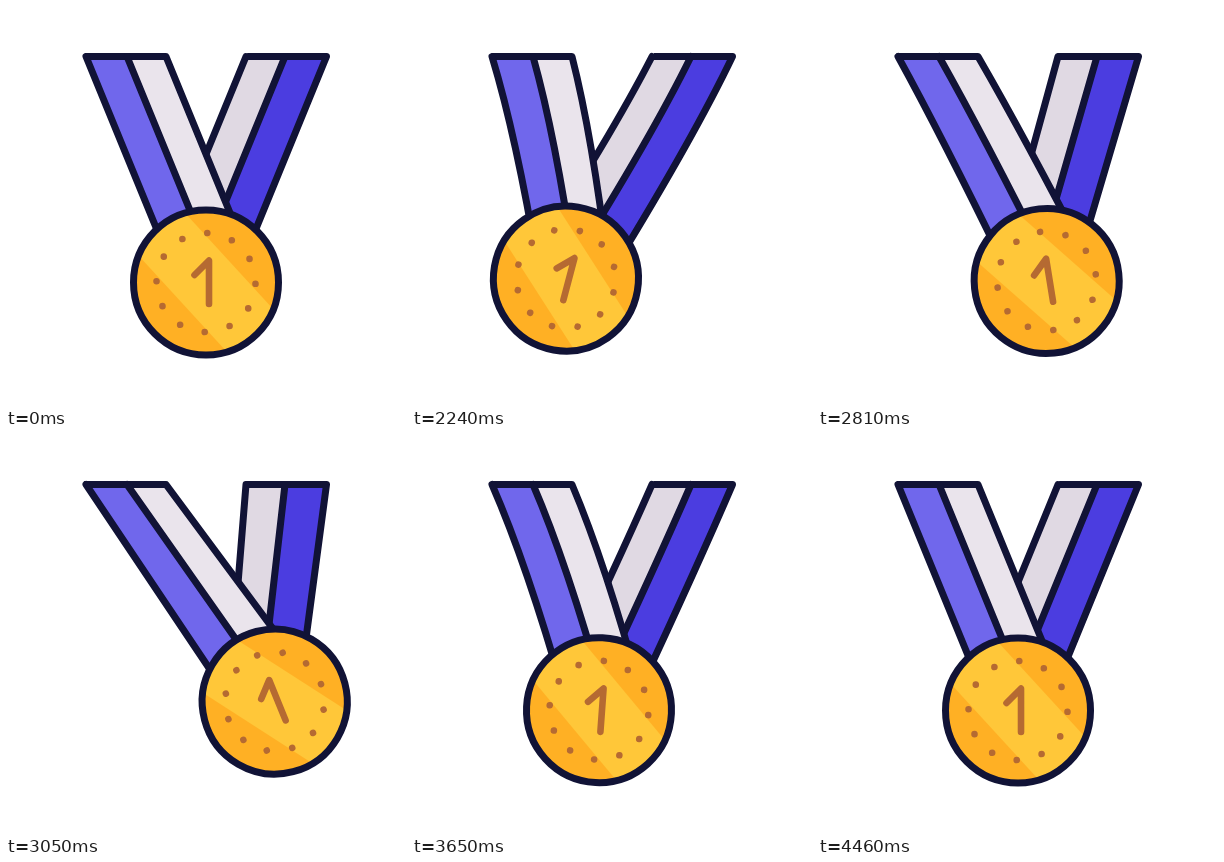
Recreate the animation shown at these times as an HTML page without scripts. Size 400x400 px, loop 4520 ms.

```html
<!DOCTYPE html>
<html lang="en">
<head>
<meta charset="utf-8">
<title>Swinging medal</title>
<style>
  /* --sway: how far the medal hangs to the left; --bend: curl of the front ribbon */
  @property --sway { syntax: "<number>"; inherits: true; initial-value: 0; }
  @property --bend { syntax: "<number>"; inherits: true; initial-value: 0; }

  @keyframes sway {
    0% { --sway: 0; --bend: 0; }
    44.25% { --sway: 0; --bend: 0; animation-timing-function: cubic-bezier(.33, .52, .64, 1); }
    55.75% { --sway: 1; --bend: 1; }
    66.04% { --sway: -1.064; --bend: 0; }
    77.21% { --sway: .312; --bend: 1; }
    88.05% { --sway: -.18; --bend: 0; }
    98.9%, 100% { --sway: 0; --bend: 0; }
  }

  html, body { margin: 0; width: 100%; height: 100%; overflow: hidden; background: #fff; }
  svg {
    display: block; width: 100vw; height: 100vh;
    animation: sway 4520ms cubic-bezier(.333, 0, .667, 1) infinite;
  }

  /* Every ribbon edge is one curve, sheared by the sway and widened by the curl */
  .area, .side, .cut {
    transform-origin: 0 0;
    transform: matrix(
      calc(10 * var(--curl)), 0,
      calc((var(--lean) + var(--gain) * var(--sway) + var(--pull) * var(--curl)) / 210), 1,
      var(--x), 50.5);
  }
  .area { d: path("M0 0Q1 80 0 210H-9999V0Z"); }
  .cut { d: path("M0 0Q1 80 0 210H9999V-9H0Z"); }
  .side { d: path("M0 0Q1 80 0 210"); }

  .front { --lean: 86; --pull: -5; --curl: max(.005, var(--bend)); }
  .front .left { --x: 80; --gain: -55; }
  .front .mid { --x: 121; --gain: -62; }
  .front .right { --x: 160; --gain: -70; }
  .back { --lean: -86; --pull: 10; --curl: max(.005, var(--sway)); }
  .back .left { --x: 240; --gain: -69; }
  .back .mid { --x: 279; --gain: -62; }
  .back .right { --x: 320.5; --gain: -58; }

  .swing { transform-origin: 200px 6.5px; transform: rotate(calc(var(--sway) * 14.75deg)); }
  .mark { transform-origin: 200px 276.5px; transform: rotate(calc(var(--sway) * 7.5deg)); }

  .white { fill: #eae4ec; }
  .purple { fill: #7067ec; }
  .white-shade { fill: #e0d9e3; }
  .purple-shade { fill: #4b3de0; }
  .line {
    fill: none; stroke: #111336; stroke-width: 7; vector-effect: non-scaling-stroke;
    stroke-linejoin: round; stroke-linecap: round;
  }
  .engraved { fill: none; stroke: #b56a32; stroke-width: 6.6; stroke-linecap: round; stroke-linejoin: round; }
</style>
</head>
<body>
<svg viewBox="0 0 400 400">
  <g class="back">
    <clipPath id="back-cut"><path class="cut left"/></clipPath>
    <clipPath id="back-white"><path class="area mid"/></clipPath>
    <g clip-path="url(#back-cut)">
      <path class="area right purple"/>
      <g clip-path="url(#back-purple)">
        <g class="front" transform="translate(12)"><path class="area right purple-shade"/></g>
      </g>
      <path class="area mid white"/>
      <g clip-path="url(#back-white)">
        <g class="front" transform="translate(12)"><path class="area right white-shade"/></g>
      </g>
      <path class="area right line"/>
      <path class="side mid line"/>
    </g>
    <path class="side left line"/>
    <clipPath id="back-purple"><path class="area right"/></clipPath>
  </g>

  <g class="front">
    <clipPath id="front-cut"><path class="cut left"/></clipPath>
    <g clip-path="url(#front-cut)">
      <path class="area right white"/>
      <path class="area mid purple"/>
      <path class="area right line"/>
      <path class="side mid line"/>
    </g>
    <path class="side left line"/>
  </g>

  <g class="swing">
    <clipPath id="in-medal"><circle cx="200" cy="276.5" r="72.5"/></clipPath>
    <circle cx="200" cy="276.5" r="72.5" fill="#ffb024"/>
    <g clip-path="url(#in-medal)">
      <rect x="100" y="245" width="200" height="63" fill="#ffc739" transform="rotate(47.5 200 276.5)"/>
    </g>
    <circle class="line" cx="200" cy="276.5" r="72.5"/>
    <g class="mark">
      <circle class="engraved" cx="200" cy="276.5" r="49.5" pathLength="12" stroke-dasharray="0 1" transform="rotate(1.5 200 276.5)"/>
      <path class="engraved" d="M188.5 269L203 254.5V298"/>
    </g>
  </g>
</svg>
</body>
</html>
```
